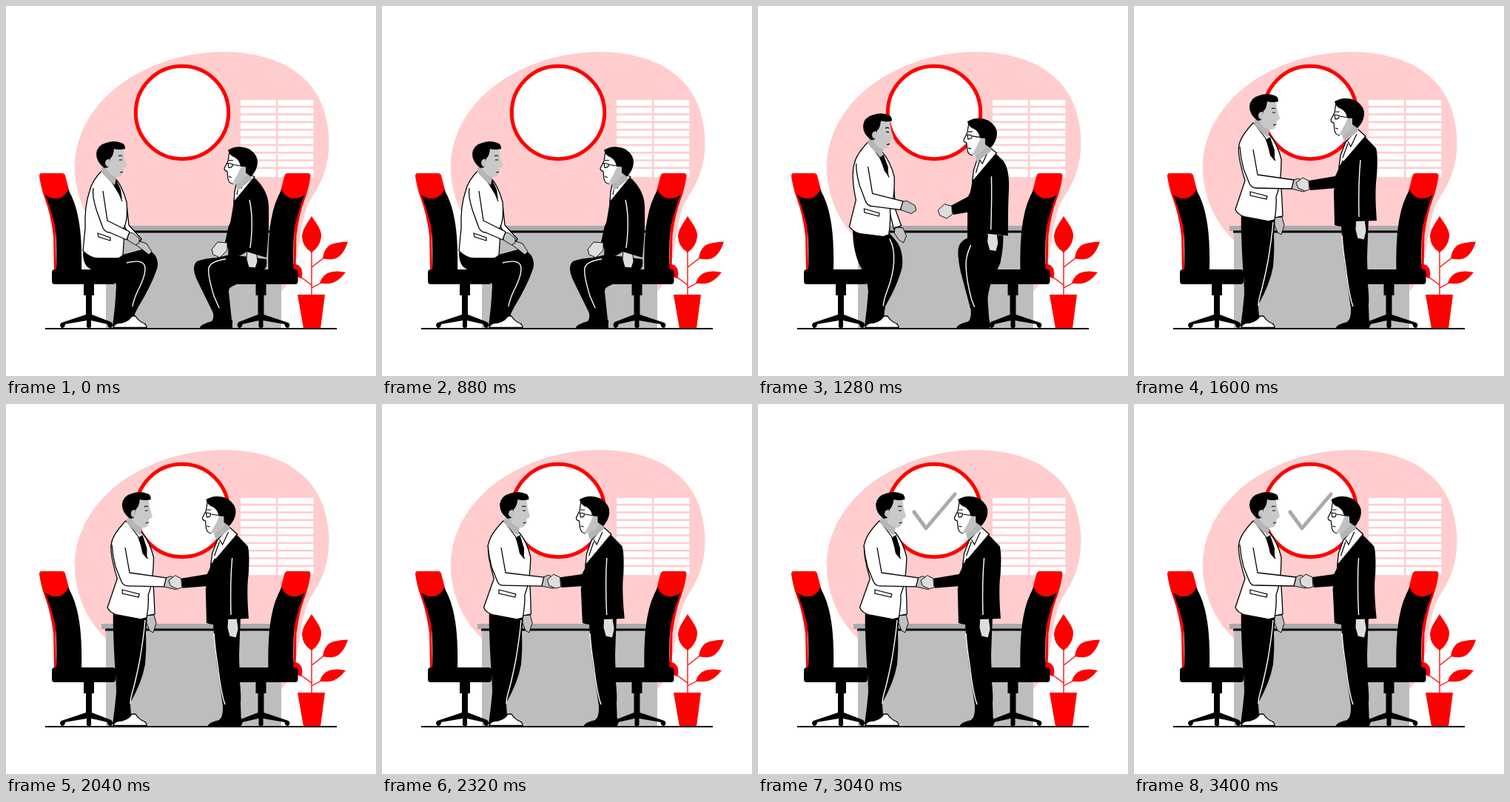
Write an HTML page that moves like this. It is 500 px wide and 500 px high and loops after 3.96 s.

```html
<!DOCTYPE html>
<html lang="en">
<head>
<meta charset="utf-8">
<title>Handshake</title>
<style>
html, body { margin: 0; width: 100%; height: 100%; overflow: hidden; background: #fff; }
svg { display: block; width: 100%; height: 100%; }
.line { fill: none; stroke: #000; stroke-width: 1.2; }
.crease { fill: none; stroke: #fff; stroke-width: 1.4; }
.cloth { fill: #fff; stroke: #000; stroke-width: 1.3; stroke-linejoin: round; }
.skin { fill: #c1c1c1; stroke: #000; stroke-width: .9; stroke-linejoin: round; }
.pale { fill: #dedede; stroke: #000; stroke-width: .9; stroke-linejoin: round; }
.red { fill: #f00; }
</style>
</head>
<body>
<svg viewBox="0 0 500 500">
  <defs>
    <g id="chair">
      <path class="red" d="M48 226H76Q79 226 80 229L86 252 74 270 67 300 68 358H65L64 310Q60 280 53 262Q47 245 45 230Q45 226 48 226Z"/>
      <path d="M53 255Q60 261 70 260Q80 258 84 248Q94 265 98 288Q103 315 102 358H68Q69 315 66 296Q60 272 53 255Z"/>
      <rect x="62" y="356" width="86" height="20" rx="4"/>
      <path d="M105 375H119V391H116V417L142 427Q146 431 142 435Q137 435 137 430L115 425V431Q116 435 112 435Q108 435 109 431V425L80 430Q80 435 75 435Q71 431 75 428L108 417V391H105Z"/>
    </g>
  </defs>
  <path fill="#ffcdcd" d="M290 62C360 61 410 88 428 136C443 180 438 222 415 256C390 292 404 350 372 386H180C170 335 145 332 120 300C92 262 85 211 102 172C125 112 200 64 290 62Z"/>
  <g id="blinds" fill="#fff"></g>
  <circle cx="238" cy="144" r="62.7" fill="#fff" stroke="#f00" stroke-width="5"/>
  <path id="check" d="M211 146L227 168 266 122" fill="none" stroke="#aaa" stroke-width="5" stroke-linecap="round" stroke-linejoin="round" pathLength="100"/>
  <path fill="#bdbdbd" d="M135 304H372V436H135Z"/>
  <path fill="#ababab" d="M129 297H378V304H129Z"/>
  <path d="M134 303.5H373V306.5H134Z"/>
  <g class="red">
    <path d="M413 284C420 295 427 303 426 312Q424 326 413 333Q401 326 400 312C400 303 406 295 413 284Z"/>
    <path d="M462 318.500Q455 340 442 342Q435 343 428 341Q429 331 436 324Q444 319 462 318.500Z"/>
    <path d="M459 360Q448 374 437 375Q430 376 424 374Q428 363 437 360Q446 357 459 360Z"/>
    <path d="M385 348Q398 348 400 358Q401 364 399 368Q388 366 385 348Z"/>
    <path d="M413 330V391M413 353L430 340M413 381L430 372M398 366L413 377" fill="none" stroke="#f00" stroke-width="1.300"/>
    <path d="M394 390H431L425 436H402Z"/>
  </g>
  <use href="#chair"/>
  <use href="#chair" transform="matrix(-1 0 0 1 456.500 0)"/>
  <path d="M53 435H447V437H53Z"/>
  <g id="legs"></g>
  <path class="cloth" d="M145 434.500Q146 428 157 428Q167 425 170 419H175Q179 426 187 429Q190 431 190 434.500Z"/>
  <g id="leftBody"></g>
  <g id="leftHead">
    <path fill="#b5b5b5" d="M166 146L162 159Q170 170 181 178L184 164Z"/>
    <path fill="#c9c9c9" d="M176 128L192 128Q193 141 197 151Q197 154 193 155L192 161Q191 167 185 167Q178 167 172 160L167 150Z"/>
    <path d="M167 155Q156 147 156 136Q157 124 169 121Q180 117 190 121Q195 122 195 129Q187 131 180 129Q179 139 175 142L172 154Z"/>
    <path fill="#c1c1c1" d="M174 143Q168 142 168 149Q170 155 174 152Z"/>
    <path class="line" d="M186 139Q189 137 191 139M187 144H191M188 161L192 160"/>
  </g>
  <g id="leftArm"></g>
  <g id="rightBody"></g>
  <g id="rightHead">
    <path fill="#b5b5b5" d="M280 169L284 184 303 169 303 156H284Z"/>
    <path fill="#fff" d="M273 131L271 144 266 154Q266 157 270 158L271 168Q272 174 278 175Q285 175 289 168L292 136Z"/>
    <path fill="#c1c1c1" d="M284 140L289 151 284 162 277 174Q286 176 294 166L300 158 294 142Z"/>
    <path d="M271 129Q285 121 300 128Q312 136 311 147Q310 157 302 165L295 160 295 152 288 151Q286 142 280 139Q273 137 271 129Z"/>
    <path class="line" d="M273 131L271 144 266 154Q266 157 270 158L271 168Q272 174 278 175M271 147L277 148Q278 153 272 153ZM278 149L291 151M272 165L276 166M272 143L278 143"/>
  </g>
  <g id="rightArm"></g>
</svg>
<script>
const LOOP = 3960;
const $ = id => document.getElementById(id);
const ramp = (t, from, to) => Math.min(1, Math.max(0, (t - from) / (to - from)));
const wave = x => (1 - Math.cos(Math.PI * x)) / 2;

function add(parent, name, attrs) {
  const el = document.createElementNS('http://www.w3.org/2000/svg', name);
  for (const key in attrs) el.setAttribute(key, attrs[key]);
  return $(parent).appendChild(el);
}

// Blends two paths that share the same commands.
function mix(a, b, k) {
  const ends = b.match(/[\d.]+/g);
  let i = 0;
  return a.replace(/[\d.]+/g, n => (+n + (ends[i++] - n) * k).toFixed(2));
}

const parts = [];
function part(parent, cls, seated, standing, shaken = standing) {
  parts.push({ el: add(parent, 'path', { class: cls }), seated, standing, shaken });
}

for (let i = 0; i < 10; i++)
  for (const x of [317, 367.5])
    add('blinds', 'rect', { x, y: 127 + i * 10.35, width: 48, height: i === 9 ? 11 : 7.8 });

// Trousers
part('legs', '',
  'M104 333C104 352 112 358 130 359Q146 362 149 378Q148 405 144 433L172 434Q170 422 178 408Q198 375 205 352Q206 330 184 329L158 336Z',
  'M145 276C144 300 146 330 147 352Q149 375 149 390Q147 412 144 433L172 434Q168 418 168 404Q184 375 188 352Q190 330 189 310L191 286Z');
part('legs', 'crease',
  'M163 347Q183 342 187 350Q191 360 178 385Q172 398 171 406',
  'M188 292Q186 315 181 345Q176 370 172 385Q168 398 168 405');
part('legs', '',
  'M352 342Q354 356 345 358L312 376Q300 380 301 386L306 434 273 434Q282 424 280 415L258 370Q250 352 258 345Q268 341 285 340L303 336Z',
  'M317 288Q316 310 315 340L316 376Q318 395 317 404L318 434 285 434Q294 424 293 408L285 352Q281 320 281 310Q280 300 280 296L290 288Z');
part('legs', '',
  'M261 436Q263 430 278 426L284 420 306 424 306 436Z',
  'M272 436Q274 430 288 427L294 420 318 424 318 436Z');
part('legs', 'crease',
  'M297 342Q276 345 274 354Q272 362 281 392L288 408',
  'M281 310Q283 335 286 352Q289 380 294 400L296 406');

// Left man
part('leftBody', 'cloth',
  'M156 270L161 300 176 321 183 315 166 296 163 268Z',
  'M190 240L190 264 189 288 201 284 200 262 198 232Z');
part('leftBody', 'skin',
  'M178 317L190 321 197 332 193 336 184 329 176 323Z',
  'M190 286L200 285 203 296 199 309 194 306 190 296Z');
part('leftBody', 'line', 'M176 321L183 316', 'M190 286L200 284');
part('leftBody', 'cloth',
  'M131 221Q116 236 113 250Q106 270 107 300L104 331Q114 341 125 341L152 341 158 337Q160 318 159 300Q165 290 163 265Q157 243 147 232Z',
  'M161 158Q144 176 142 188Q139 200 150 236L137 275Q140 282 150 285L182 291 190 289Q193 270 192 258Q199 240 199 207Q194 187 184 175Z');
part('leftBody', '',
  'M144 238L149 235 155 248 157 261 152 253Z',
  'M179 180L184 177 190 195 190 209 184 202Z');
part('leftBody', 'line',
  'M131 221L145 241 153 254 157 264',
  'M162 158L178 179 184 196 191 209');
part('leftBody', 'line',
  'M124 307L141 313 141 317 125 312Z',
  'M157 251L180 257 179 261 157 256Z');

part('leftArm', 'skin',
  'M164 306L172 307 180 314 180 320 175 323 164 316Z',
  'M213 236L222 233 235 239 237 246 229 251 213 247Z',
  'M216 235L225 231 237 237 240 244 232 249 216 246Z');
part('leftArm', 'cloth',
  'M118 246Q116 255 122 275L131 300Q134 306 140 306L163 316 167 305 137 290 131 250',
  'M143 190Q144 205 148 220L156 240Q159 246 165 246L213 247 216 235 167 228 161 194',
  'M143 190Q144 205 148 220L156 240Q159 246 165 245L216 246 219 234 167 228 161 194');

// Right man
part('rightBody', 'pale',
  'M326 328L338 329 340 345 337 354 328 353 325 342Z',
  'M300 287L312 288 314 304 311 316 302 314 299 302Z');
part('rightBody', '',
  'M316 232Q308 250 307 270L302 300 300 338Q312 342 325 332L352 340Q356 300 355 270Q354 250 338 234L330 229Z',
  'M290 178Q278 200 276 222L270 250 271 296Q285 302 299 291L328 290Q325 250 328 230Q330 200 327 192L304 168Z');
part('rightBody', 'cloth',
  'M312 236L309 251 308 265 336 231 327 226Z',
  'M286 184L279 202 277 218 313 176 302 166Z');
part('rightBody', 'line',
  'M315 240L312 255M323 234L318 246 314 242',
  'M289 186L282 205M301 173L293 190 289 183');
part('rightBody', 'crease',
  'M329 262Q335 288 330 327',
  'M306 208Q303 240 304 285');

part('rightArm', '',
  'M318 264L301 297 296 319 301 329 318 322 330 290Z',
  'M282 208L272 230 236 236 238 249 274 246 298 240Z',
  'M282 208L270 230 241 234 243 248 272 246 298 240Z');
part('rightArm', 'pale',
  'M299 320L286 319 278 329 280 336 289 340 299 330Z',
  'M236 236L228 232 219 239 222 246 231 250 237 248Z',
  'M241 234L232 230 224 237 226 245 235 249 242 247Z');

// Leans a group by the given distance at head height, pivoting at the hips.
const lean = d => `matrix(1 0 ${-d / 150} 1 ${2 * d} 0)`;

function draw(t) {
  const rise = wave(ramp(t, 880, 1600));
  const clock = Math.min(Math.max(t - 1920, 0), 1480);
  const shake = wave(clock / 493.3);
  const nod = wave(clock / 370);
  const down = 1 - rise;

  for (const { el, seated, standing, shaken } of parts)
    el.setAttribute('d', mix(seated, shaken === standing ? standing : mix(standing, shaken, shake), rise));

  const left = lean(3 * nod), right = lean(-4 * shake);
  $('leftBody').setAttribute('transform', left);
  $('rightBody').setAttribute('transform', right);
  $('leftHead').setAttribute('transform', `${left} translate(${-34 * down} ${64 * down})`);
  $('rightHead').setAttribute('transform', `${right} translate(${29 * down} ${65.5 * down})`);

  const drawn = wave(ramp(t, 2360, 2920));
  $('check').style.visibility = drawn > 0 ? 'visible' : 'hidden';
  $('check').setAttribute('stroke-dasharray', `${100 * drawn} 200`);
}

const start = performance.now();
function tick() {
  draw((performance.now() - start) % LOOP);
  requestAnimationFrame(tick);
}
tick();
</script>
</body>
</html>
```
